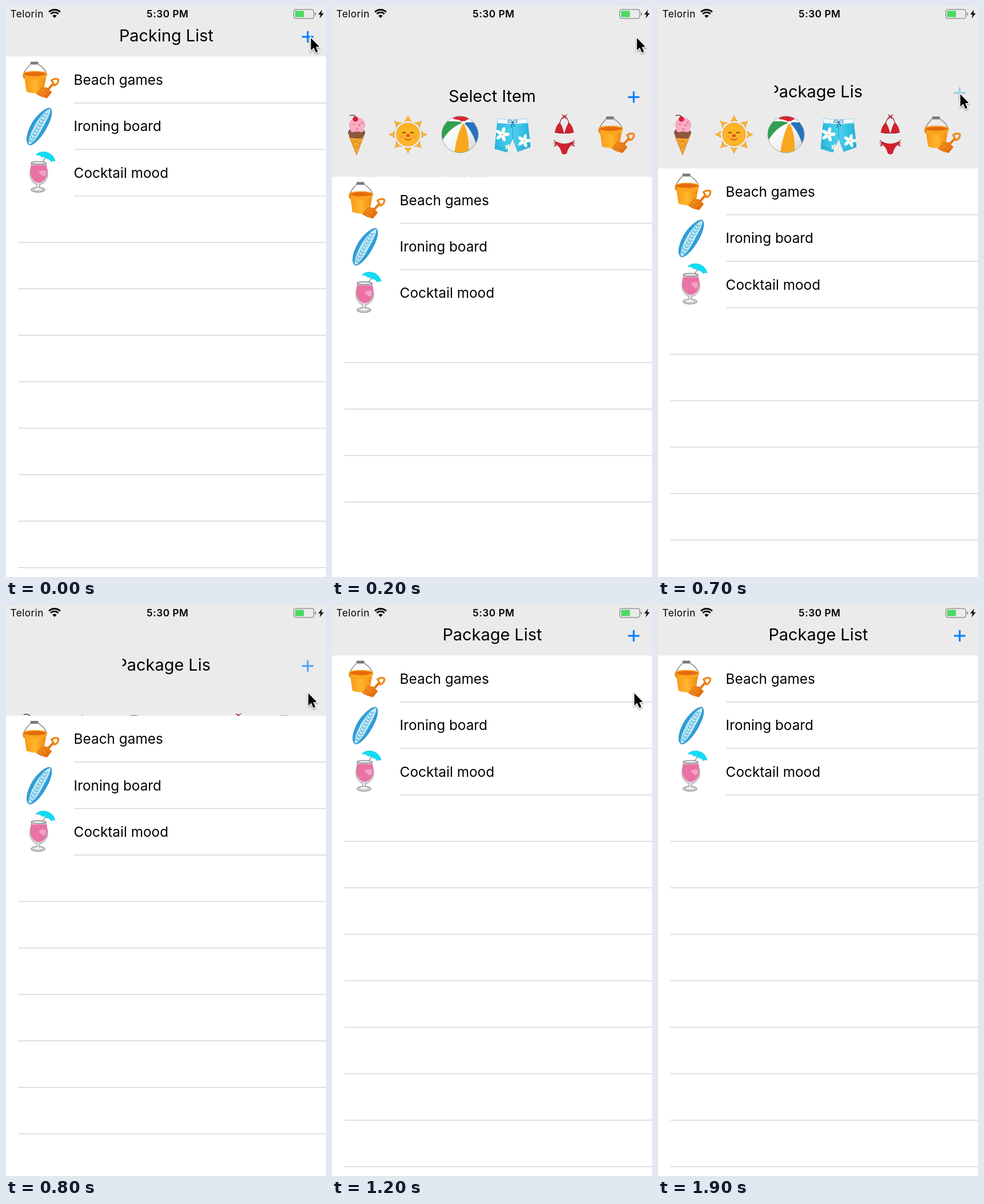
An HTML page with a canvas that plays this animation: 560x1000 px, repeating every 2000 ms.

```html
<!DOCTYPE html>
<html lang="en">
<head>
<meta charset="utf-8">
<title>Packing List</title>
<style>
  html, body { margin: 0; width: 100%; height: 100%; overflow: hidden; background: #fff; }
  canvas { display: block; width: 560px; height: 1000px; }
</style>
</head>
<body>
<canvas id="stage" width="560" height="1000"></canvas>
<script>
const ctx = document.getElementById('stage').getContext('2d');
const TAU = Math.PI * 2;
const LOOP = 2000, STEP = 100;
const ROW = 81.38, BAR_CLOSED = 88.6, BAR_TRAVEL = 210.6;
const BLUE = '#007aff';

function paint(fill, stroke, width = 1) {
  if (fill) { ctx.fillStyle = fill; ctx.fill(); }
  if (stroke) { ctx.strokeStyle = stroke; ctx.lineWidth = width; ctx.stroke(); }
}
function shape(d, fill, stroke, width = 1) {
  const path = new Path2D(d);
  if (fill) { ctx.fillStyle = fill; ctx.fill(path); }
  if (stroke) { ctx.strokeStyle = stroke; ctx.lineWidth = width; ctx.stroke(path); }
}
function oval(x, y, rx, ry, fill, stroke, width, turn = 0) {
  ctx.beginPath();
  ctx.ellipse(x, y, rx, ry, turn, 0, TAU);
  paint(fill, stroke, width);
}
function box(x, y, w, h, r, fill, stroke, width) {
  ctx.beginPath();
  ctx.roundRect(x, y, w, h, r);
  paint(fill, stroke, width);
}
function text(str, x, y, size, weight = 400, align = 'left', spacing = 0) {
  ctx.font = `${weight} ${size}px Inter, sans-serif`;
  ctx.textAlign = align;
  ctx.letterSpacing = spacing + 'px';
  ctx.fillStyle = '#000';
  ctx.fillText(str, x, y);
}
function at(x, y, draw) {
  ctx.save();
  ctx.translate(x, y);
  draw();
  ctx.restore();
}
function gradient(x0, y0, x1, y1, ...colors) {
  const g = ctx.createLinearGradient(x0, y0, x1, y1);
  colors.forEach((c, i) => g.addColorStop(i / (colors.length - 1), c));
  return g;
}

// Icons are drawn around their own centre.
function bucket() {
  shape('M-31-6Q-29-16-18-27M-4-27Q8-20 11-8', null, '#777', 1.3);
  box(-18, -31.5, 14, 5, 1.5, '#77797c');
  shape('M-29-8L-25 21Q-10 27 5 22L10-8Z', gradient(-29, 0, 10, 0, '#f69a16', '#ffb52c', '#f18a12'));
  shape('M-30-10Q-10-2 11-10L10-4Q-10 4-29-4Z', '#fba51f');
  oval(-10, -10, 20.5, 4.5, '#e66a0b', '#f9a21f', 1.8);
  oval(-29, -5, 1.8, 3, '#e88a18');
  ctx.lineCap = 'round';
  shape('M13 17L22 7', null, '#e87610', 4);
  shape('M19 1Q27-4 31 0Q31 8 24 10Z', null, '#ef8513', 3.2);
  shape('M2 14L11 14L19 22L11 32Q0 30-7 25Z', gradient(0, 14, 8, 32, '#f18c18', '#e2690c'), '#dc6d0c', 1);
  shape('M1 18L10 26M-3 23L6 30', null, '#f8a13a', 1);
}

function surfboard() {
  ctx.rotate(0.49);
  shape('M3-37C12-34 14-12 13 3C12 20 7 36 0 37C-8 36-13 20-13 3C-13-14-5-36 3-37Z', '#2d9fda', '#2788c0', 0.8);
  shape('M3-36C8-32 7-12 7 2C7 18 5 34 0 36C-5 33-7 18-7 2C-7-14-2-33 3-36Z', '#d3eef7');
  for (let y = -28; y <= 26; y += 6) {
    shape(`M-5 ${y}l5 4l5-4M-4 ${y + 3}l3 2M4 ${y + 3}l-3 2`, null, '#62bddf', 1.3);
  }
  shape('M2-35Q0 0 0 36', null, '#8acde4', 0.7);
}

function cocktail() {
  shape('M13-28L2-10', null, '#888', 1.5);
  shape('M-5-31Q2-38 13-36Q26-33 29-20Q25-22 22-19Q19-25 14-24Q11-29 6-27Q2-32-5-31Z', '#12dcf7', '#00bfdc', 0.7);
  shape('M-12-17C-13-9-17 0-14 9Q-10 19-3 21L-3 28L2 28L2 21Q11 19 15 9C18 0 13-9 13-17Z', '#d9d9dc', '#8b8b90', 1);
  shape('M-13-13C-15-3-15 3-12 9Q-8 17 0 18Q9 17 13 9C16 3 15-4 14-13Z', '#ea72a4');
  shape('M0-1Q6-6 13-3Q14 4 9 7Q4 4 0-1Z', '#f3a2c5');
  oval(0, -17, 13, 2.6, '#e8e8ea', '#77787c', 1.2);
  oval(-1, 30, 12.5, 4.4, '#c7c7cb', '#8b8b90', 1);
  oval(-1, 29, 7, 2, '#f1f1f3');
  shape('M-1 20L-1 28', null, '#f6f6f8', 1.6);
}

function iceCream() {
  shape('M-13 4L13 2L0 36Z', '#f5a72e', '#ce7d20', 0.8);
  shape('M-9 10L8 15M-6 19L5 24M9 6L-8 16M7 14L-4 25', null, '#d58121', 1);
  oval(0, -3, 14.5, 9.5, '#8f5640', '#6f3f2e', 0.7);
  oval(-8, 2, 5, 4.5, '#8f5640');
  oval(7, 3, 5, 4, '#8f5640');
  oval(1, -17, 13.5, 12, '#f9adc4', '#e385a4', 0.7);
  oval(-6, -8, 5, 4, '#f9adc4');
  oval(8, -8, 5, 4, '#f9adc4');
  shape('M-6-19l3 2M3-16l4-1M8-22l2 3M0-10l3 1', null, '#cf5577', 1.4);
  shape('M-12-33Q-4-36 0-29', null, '#4b2725', 1.4);
  oval(-2, -27, 4.8, 4.5, '#d71e35');
}

function sun() {
  for (let i = 0; i < 8; i++) {
    ctx.save();
    ctx.rotate(i * TAU / 8);
    shape('M-6-23Q0-26 6-23Q2-27 0-33Q-2-27-6-23Z', '#fcb62a', '#eda02a', 1);
    ctx.restore();
  }
  oval(0, 0, 20, 20, '#fdb526', '#eb961b', 1);
  shape('M-10-2Q-7-6-4-2M4-2Q7-6 10-2', null, '#6f3c0d', 1.3);
  shape('M-6 7Q0 12 6 7', null, '#b34a12', 1.3);
  oval(0, 2, 3, 2.6, '#e8452a');
  oval(-11, 4, 3, 2, '#fba03a');
  oval(11, 4, 3, 2, '#fba03a');
}

function ball() {
  ctx.save();
  ctx.beginPath();
  ctx.arc(0, 0, 32, 0, TAU);
  ctx.clip();
  ctx.fillStyle = gradient(-20, -20, 25, 28, '#fff', '#f4f4f4', '#d8d8d8');
  ctx.fillRect(-33, -33, 66, 66);
  shape('M6-21Q-2-27-13-27L-4-36L20-33L15-27Q10-25 6-21Z', '#dd2430');
  shape('M6-21Q-10-24-22-23L-36-4L-30 9Q-17-13 6-21Z', '#2fa04f');
  shape('M6-21Q-6 0-10 34L15 34Q17 0 6-21Z', '#f8a71f');
  shape('M6-21Q20-9 28 15L36 0L24-21Q14-22 6-21Z', '#2572bd');
  oval(6, -21, 3.5, 2.5, '#fff');
  ctx.restore();
  oval(0, 0, 32, 32, null, '#8f8f8f', 0.8);
}

function flower(x, y, r) {
  for (let i = 0; i < 5; i++) {
    const a = i * TAU / 5 - 1.3;
    oval(x + Math.cos(a) * r, y + Math.sin(a) * r, r * 0.85, r * 0.45, '#fff', null, 1, a);
  }
  oval(x, y, 1.8, 1.8, '#f5d45b');
}

function shorts() {
  shape('M-26-25L26-25L31 22L9 30L0 6L-10 31L-31 25Z', gradient(-30, 0, 30, 0, '#2cb7dd', '#4cd0ee', '#27b4dc'), '#1f9cc2', 0.8);
  shape('M0-18L0 6M-10 27L-29 21M9 26L30 18', null, '#1a99c0', 1);
  shape('M-26-28Q0-24 26-28L27-20Q0-17-27-20Z', '#eefaff', '#8dc9dc', 0.8);
  shape('M0-22Q-7-29-8-22Q-4-20 0-22Q7-29 8-22Q4-20 0-22L-3-12M0-22L4-14', null, '#186f9c', 1.2);
  flower(-18, 0, 7);
  flower(20, 11, 6.5);
  flower(-8, 22, 3);
}

function bikini() {
  const red = '#d5202d', dark = '#a5121f';
  shape('M-8-20Q-5-30 0-32Q6-30 8-20M0-32l-4-3M0-32l5-3M0-32l-3 5M0-32l3 5', null, dark, 1.2);
  shape('M-8-21Q-3-13-1-3Q-8-1-16-4Q-15-14-8-21Z', red, dark, 0.7);
  shape('M8-21Q3-13 1-3Q8-1 16-4Q15-14 8-21Z', red, dark, 0.7);
  shape('M-17-4Q0 0 17-4', null, dark, 1.2);
  shape('M-14 13Q0 20 14 13L13 18Q6 23 4 33Q0 36-4 33Q-6 23-13 18Z', red, dark, 0.7);
  for (const s of [-1, 1])
    shape(`M${s * 14} 14l${s * 4}-4M${s * 14} 14l${s * 5} 1M${s * 14} 14l${s * 4} 7M${s * 14} 14l${s} 7`, null, dark, 1.2);
}

const menu = [[iceCream, 43], [sun, 133], [ball, 224], [shorts, 316], [bikini, 406.5], [bucket, 497.5]];
const items = [['Beach games', bucket, 60.7], ['Ironing board', surfboard, 57.5], ['Cocktail mood', cocktail, 57]];

function statusBar() {
  text('Telorin', 7.5, 20.3, 17.3, 400, 'left', 0.4);
  text('5:30 PM', 282.8, 20.2, 17.3, 600, 'center', 0.5);
  ctx.lineCap = 'butt';
  for (const r of [14, 9.3]) {
    ctx.beginPath();
    ctx.arc(85, 20.5, r, -TAU * 0.375, -TAU * 0.125);
    paint(null, '#000', 2.8);
  }
  shape('M85 21L81.2 17Q85 14 88.8 17Z', '#000');
  box(503.6, 6.2, 35, 15.6, 3.6, null, '#85858a', 1.3);
  box(506, 8.6, 15.4, 10.8, 1.2, '#4cd964');
  box(540.5, 11.5, 1.9, 5, 1, '#85858a');
  shape('M553 6.5L546.5 14.8L550.5 14.8L549 21.5L556 12.8L551.8 12.8Z', '#000');
}

function plus(y, color) {
  ctx.fillStyle = color;
  ctx.fillRect(518, y - 1.5, 20, 3);
  ctx.fillRect(526.5, y - 10, 3, 20);
}

function pointer(x, y) {
  at(x, y, () => {
    ctx.shadowColor = 'rgba(0,0,0,.35)';
    ctx.shadowBlur = 3;
    ctx.shadowOffsetY = 1.5;
    ctx.lineJoin = 'miter';
    const arrow = 'M0 0L0 21.5L5 17L8.7 25.5L12.2 24L8.6 15.8L14.7 15.3Z';
    shape(arrow, '#fff', '#fff', 3);
    ctx.shadowColor = 'transparent';
    shape(arrow, '#000');
  });
}

function list(top, tick) {
  const growing = tick === 1 || tick === 2;
  ctx.fillStyle = '#fff';
  ctx.fillRect(0, top, 560, 1000 - top);
  items.forEach(([name, icon, x], i) => {
    const mid = top + ROW * i + 40.5;
    at(x, mid, icon);
    text(name, 118.6, mid + 8.8, 24.35);
  });
  const lastLine = tick === 2 ? 7 : 11;
  ctx.fillStyle = '#d4d4d7';
  for (let k = 1; k <= lastLine; k++) {
    if (k === 3 && growing) continue;
    const x = k <= 3 ? 119 : 21.5;
    ctx.fillRect(x, top + ROW * k - 0.9, 560 - x, 1.4);
  }
}

// How far the bar is pulled down at each step; closed afterwards.
const openness = [0, 0.423, 1, 1, 1, 1, 1, 0.93, 0.5];

function draw(ms) {
  const tick = Math.floor(ms / STEP);
  const open = openness[tick] || 0;
  const top = BAR_CLOSED + BAR_TRAVEL * open;
  const closing = tick === 7 || tick === 8;
  const title = tick === 0 ? 'Packing List' : tick < 7 ? 'Select Item' : 'Package List';

  ctx.fillStyle = '#ebebec';
  ctx.fillRect(0, 0, 560, top);
  if (open) for (const [icon, x] of menu) at(x, 225, icon);
  list(top, tick);
  statusBar();

  ctx.save();
  if (closing) {
    ctx.beginPath();
    ctx.rect(203.7, 0, 153.4, top);
    ctx.clip();
  }
  text(title, 280.4, 62.3 + 105.3 * open, 28.9, 400, 'center');
  ctx.restore();
  plus(54 + 105.6 * open, tick === 7 ? '#95cce6' : tick === 8 ? '#4aa3f2' : BLUE);

  // The pointer follows the button down and is hidden near the end.
  if (tick < 17) {
    const move = Math.min(1, Math.max(0, (tick - 2) / 4));
    const ease = move * move * (3 - 2 * move);
    pointer(533.6 - 4.5 * ease, 56 + 98.5 * ease);
  }
}

function loop(now) {
  draw(now % LOOP);
  requestAnimationFrame(loop);
}
requestAnimationFrame(loop);
</script>
</body>
</html>
```
